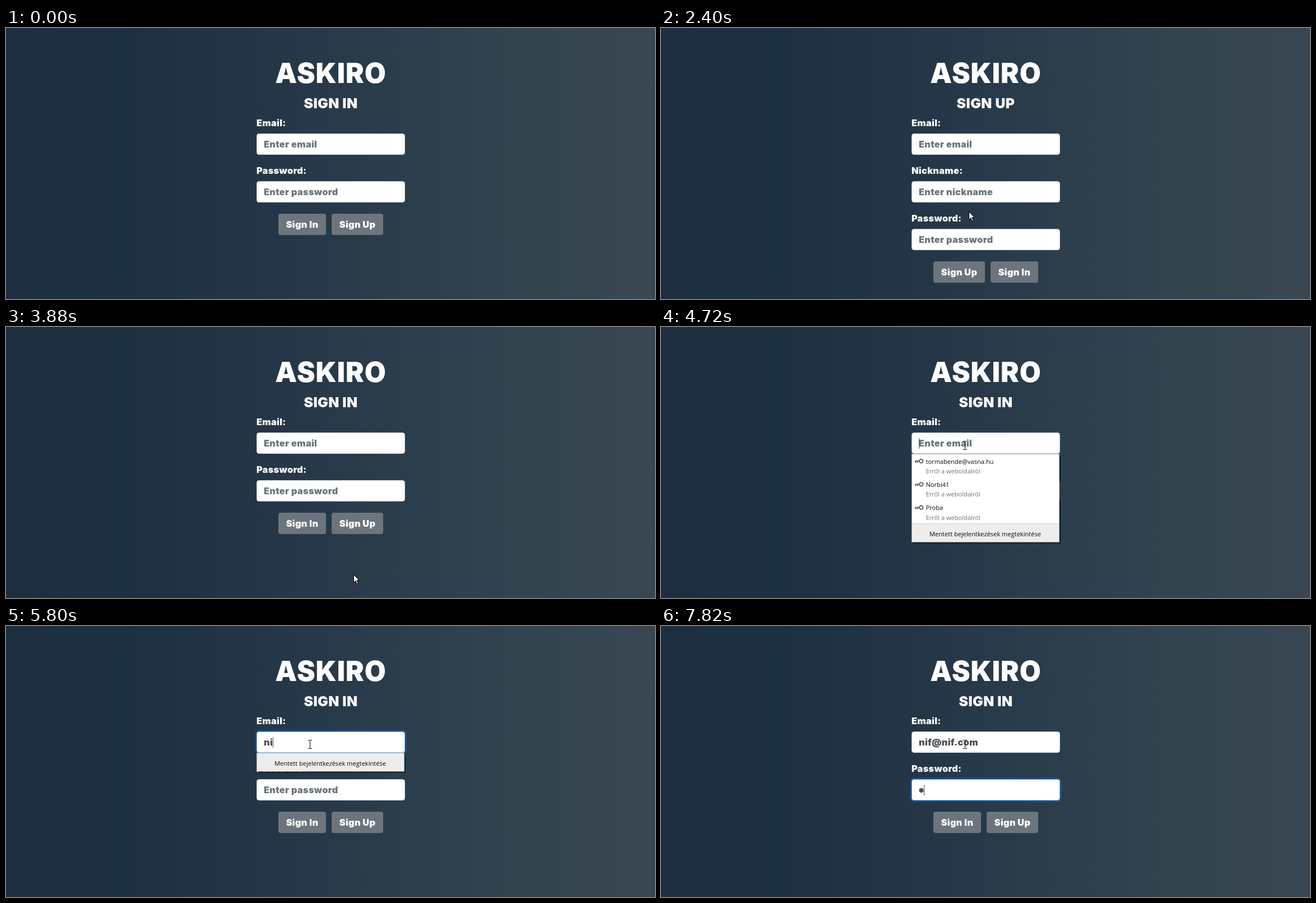
Recreate the animation shown at these times as an HTML page. Size 1158 by 483 pixels, loop 8000 ms.

```html
<!DOCTYPE html>
<html lang="en">
<head>
<meta charset="utf-8">
<title>Sign in</title>
<style>
  html, body { margin: 0; width: 100%; height: 100%; overflow: hidden; }
  svg {
    display: block; width: 1158px; height: 483px;
    background: linear-gradient(90deg, #1c2e3f, #1d3041 19%, #283949 50%, #32444f 78%, #394753);
  }
  text { font: 900 16.3px Inter, sans-serif; letter-spacing: .02em; fill: #fff; }
  .title { font-size: 49px; text-anchor: middle; }
  .subtitle { font-size: 24.8px; text-anchor: middle; }
  .field { fill: #fff; stroke: #ced4da; }
  .hint { fill: #6c757d; }
  .value { fill: #495057; }
  .button { fill: #6c757d; }
  .button.hover { fill: #5a6268; }
  .button + text { text-anchor: middle; }
  .ring { fill: none; stroke: #007bff; stroke-opacity: .25; stroke-width: 3; }
  .edge { fill: none; stroke: #80bdff; }
  .popup text { font: 400 11.1px "Open Sans", "Noto Sans", sans-serif; letter-spacing: 0; fill: #0c0c0d; }
  .popup .note { fill: #737373; }
  .popup .footer { text-anchor: middle; }
  .key { fill: none; stroke: #666; stroke-width: 2; }
  .pointer { fill: #fff; stroke: #000; stroke-linejoin: round; }
  .beam { fill: none; stroke: #000; }
</style>
</head>
<body>
<svg id="stage" viewBox="0 0 1158 483"></svg>
<script>
const LOOP = 8000;
const ROW = 85;
const stage = document.getElementById('stage');
const pen = document.createElement('canvas').getContext('2d');

const logins = ['tormabende@vasna.hu', 'Norbi41', 'Proba'];
const address = 'nif@nif.com';
const keyTimes = [5570, 5720, 5880, 6260, 6650, 6800, 6880, 7030, 7200, 7270, 7350];

const pages = {
  in: {
    heading: 'SIGN IN', fields: ['Email', 'Password'],
    buttons: [['Sign In', 486, 85], ['Sign Up', 581, 92]]
  },
  up: {
    heading: 'SIGN UP', fields: ['Email', 'Nickname', 'Password'],
    buttons: [['Sign Up', 486, 92], ['Sign In', 588, 85]]
  }
};

// Each move: first step, last step, step count, path points.
const moves = [
  [300, 840, 8, [[1093, 468], [932, 414], [690, 355], [639, 345]]],
  [1540, 1690, 3, [[610, 296], [570, 225], [548, 182]]],
  [1860, 2090, 4, [[548, 186], [550, 204], [551, 221]]],
  [2240, 2640, 6, [[551, 236], [548, 350], [540, 457]]],
  [2870, 3330, 7, [[541, 453], [548, 445], [553, 441]]],
  [3410, 3640, 4, [[560, 441], [590, 441], [620, 441]]],
  [4190, 4640, 7, [[617, 432], [580, 320], [542, 211]]]
];

const during = (t, from, to) => t >= from && t < to;

function along(points, f) {
  const s = f * (points.length - 1);
  const i = Math.min(Math.floor(s), points.length - 2);
  return points[i].map((v, k) => Math.round(v + (points[i + 1][k] - v) * (s - i)));
}

function cursorAt(t) {
  const move = moves.filter(m => t >= m[0]).pop();
  if (!move) return null;
  const [from, to, steps, points] = move;
  const gap = (to - from) / (steps - 1);
  const step = Math.min(Math.floor((t - from) / gap + 0.05), steps - 1);
  return along(points, step / (steps - 1));
}

const text = (x, y, str, cls = '') => `<text class="${cls}" x="${x}" y="${y}">${str}</text>`;
const box = (x, y, w, h, cls, r = 4) =>
  `<rect class="${cls}" x="${x}" y="${y}" width="${w}" height="${h}" rx="${r}"/>`;
const caret = (x, y) => `<rect x="${x}" y="${y}" width="1" height="19" fill="#495057"/>`;

function focusRing(row, strength) {
  if (!strength) return '';
  const y = 188 + row * ROW;
  return `<g opacity="${strength}">` + box(445.5, y - 1.5, 268, 41, 'ring', 5.5)
    + box(447.5, y + .5, 264, 37, 'edge') + '</g>';
}

function popup(y, names) {
  const list = names.length * 41.4;
  const h = list + 33;
  const rows = names.map((name, i) => {
    const top = y + i * 41.4;
    return `<path class="key" d="M453 ${top + 13}h8M454.5 ${top + 13}v3M458 ${top + 13}v3"/>`
      + `<circle class="key" cx="464.3" cy="${top + 13}" r="3.2"/>`
      + text(472.5, top + 17.5, name) + text(472.5, top + 35, 'Erről a weboldalról', 'note');
  }).join('');
  return `<g class="popup">
    <rect x="450" y="${y + 3}" width="263" height="${h - .5}" fill="#000" opacity=".5"/>
    <rect x="447.5" y="${y + .5}" width="263" height="${h - .5}" fill="#fff" stroke="#b4b4b4"/>
    <rect x="448" y="${y + list + 1}" width="262" height="31.5" fill="#ededed"/>
    ${names.length ? `<path d="M448 ${y + list + .5}h262" stroke="#ccc"/>` : ''}
    ${rows}${text(578.5, y + list + 22.5, 'Mentett bejelentkezések megtekintése', 'footer')}</g>`;
}

function drawCursor(pos, page, hovered) {
  if (!pos) return '';
  const [x, y] = pos;
  const overField = during(x, 447, 712)
    && page.fields.some((_, i) => during(y, 188 + i * ROW, 226 + i * ROW));
  const put = (cls, d) => `<path class="${cls}" transform="translate(${x} ${y})" d="${d}"/>`;
  if (hovered) return put('pointer', 'M-1.5 12V1.5Q-1.5 0 0 0T1.5 1.5V7Q3.5 6 4.5 8Q6.5 7 7.2 9Q9 8.5 9 10.5V15Q9 18 7 19.5V21.5H-1V19.5L-5.6 13.5Q-6 11-4 11Z');
  if (overField) return put('beam', 'M-3-7.5H0M1-7.5H4M.5-7V7M-3 7.5H0M1 7.5H4');
  return put('pointer', 'M.5.5V14.5L3.7 11.4 6 16.8 8.2 15.8 5.9 10.6H10.2Z');
}

function emailRing(t) {
  if (t < 4720 || t >= 7670) return 0;
  if (t < 4800) return .3;
  return t < 7580 ? 1 : .5;
}

function passwordRing(t) {
  if (t < 7580) return 0;
  return t < 7670 ? .5 : 1;
}

function scene(t) {
  const page = during(t, 1070, 3790) ? pages.up : pages.in;
  const typed = address.slice(0, keyTimes.filter(k => t >= k).length);
  const secret = t >= 7820;
  const pos = cursorAt(t);
  const buttonTop = 161 + page.fields.length * ROW;
  const isOver = ([, x, w]) => pos && during(pos[0], x, x + w) && during(pos[1], buttonTop, buttonTop + 38);
  const out = [text(579.5, 98, 'ASKIRO', 'title'), text(579.5, 143, page.heading, 'subtitle')];

  page.fields.forEach((name, i) => {
    const y = i * ROW;
    out.push(text(447, 174.5 + y, name + ':'), box(447.5, 188.5 + y, 264, 37, 'field'));
    if (name === 'Email' && typed) out.push(text(460, 213 + y, typed, 'value'));
    else if (name === 'Password' && secret) out.push(`<circle class="value" cx="464.5" cy="${208 + y}" r="4"/>`);
    else out.push(text(460, 213 + y, 'Enter ' + name.toLowerCase(), 'hint'));
  });

  page.buttons.forEach(b => {
    const [name, x, w] = b;
    out.push(box(x, buttonTop, w, 38, isOver(b) ? 'button hover' : 'button'),
      text(x + w / 2, buttonTop + 25, name));
  });

  out.push(focusRing(0, emailRing(t)), focusRing(1, passwordRing(t)));

  const blinkOff = during(t, 5110, 5570) || during(t, 6110, 6260) || during(t, 6570, 6650);
  if (during(t, 4640, 7500) && !blinkOff) {
    pen.font = '900 16.3px Inter, sans-serif';
    pen.letterSpacing = '0.326px';
    out.push(caret(Math.round(460 + pen.measureText(typed).width), 198));
  }
  if (t >= 7500) out.push(caret(secret ? 469 : 460, 283));

  if (during(t, 4720, 5650)) out.push(popup(226, logins));
  else if (during(t, 5650, 5800)) out.push(popup(226, [logins[1]]));
  else if (during(t, 5800, 7500)) out.push(popup(226, []));
  else if (during(t, 7580, 7820)) out.push(popup(311, logins));

  out.push(drawCursor(pos, page, page.buttons.some(isOver)));
  return out.join('');
}

let shown = '';
function tick(now) {
  const next = scene(now % LOOP);
  if (next !== shown) stage.innerHTML = shown = next;
  requestAnimationFrame(tick);
}
tick(performance.now());
</script>
</body>
</html>
```
